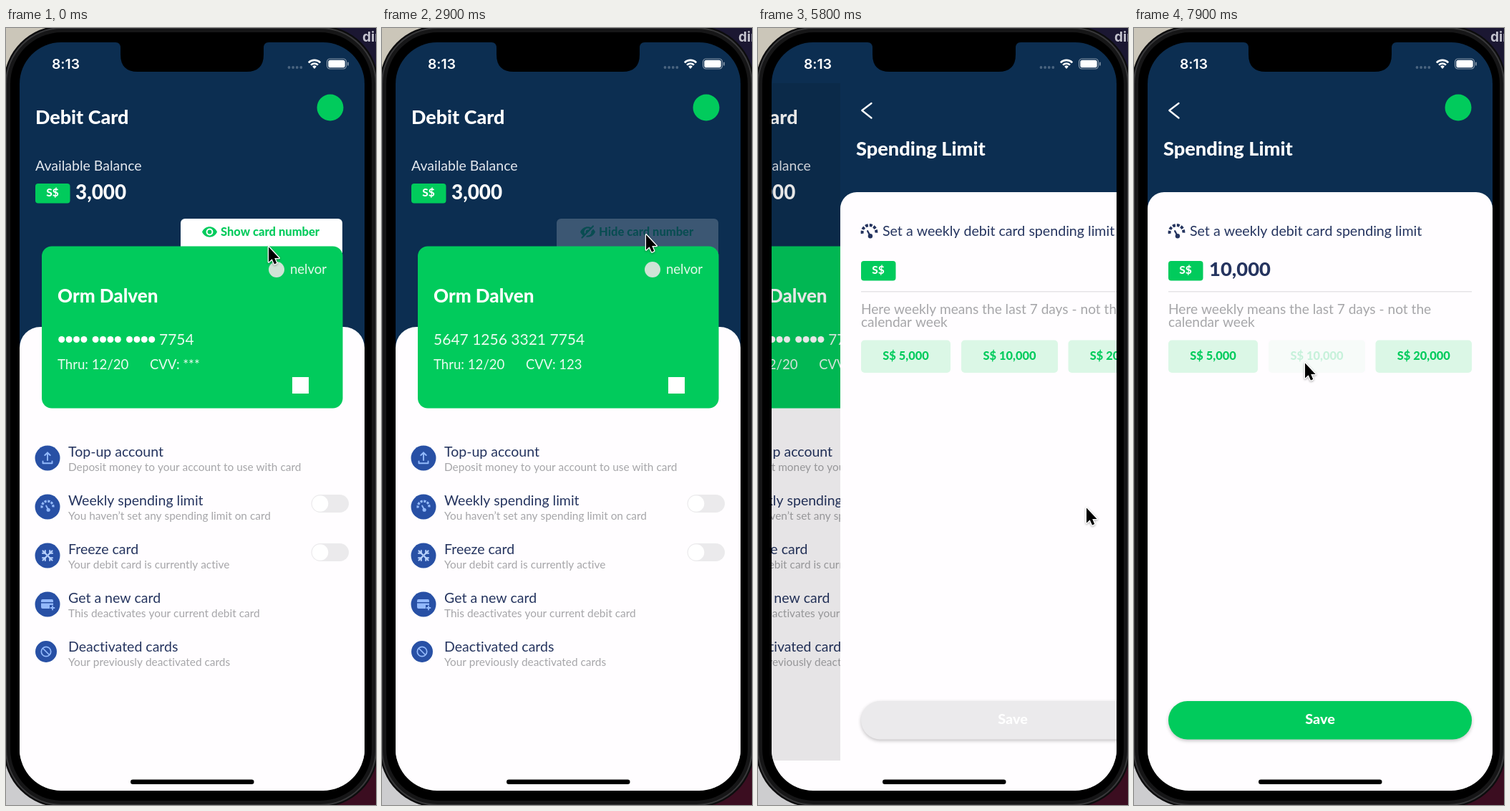
An HTML page with a canvas that plays this animation: 517 px wide and 1084 px high, repeating every 8 s.

```html
<!DOCTYPE html>
<html lang="en">
<head>
<meta charset="utf-8">
<title>Debit card app</title>
<style>
html, body { margin: 0; width: 517px; height: 1084px; overflow: hidden; background: #000; }
canvas { display: block; width: 517px; height: 1084px; }
</style>
</head>
<body>
<canvas id="stage"></canvas>
<script>
const W = 517, H = 1084, LOOP = 8000;
const NAVY = '#0c2e51', GREEN = '#01cb5c', PAPER = '#fffdff', INK = '#25345f';
const GREY = '#a6a6a9', TRACK = '#ebeaec', BLUE = '#2850a5', SKY = '#93b9fb';
const SCREEN = { x: 19, y: 20, w: 482, h: 1044 };
const SAFE_TOP = 77, SAFE_BOTTOM = 1022;

const REVEAL = { press: 650, release: 850 };
const CONCEAL = { press: 2700, release: 2980 };
const PICK = { press: 7600, release: 7870 };
const PUSH_START = 5561;
// time, x, y of the pointer tip
const POINTER = [
  [0, 366, 304], [150, 366, 304], [600, 368, 287], [3300, 368, 287],
  [4700, 456, 715], [4900, 456, 715], [5350, 458, 668], [6050, 458, 668],
  [6800, 238, 466], [8000, 238, 466]
];

const canvas = document.getElementById('stage');
const c = canvas.getContext('2d');
const dpr = window.devicePixelRatio || 1;
canvas.width = W * dpr;
canvas.height = H * dpr;

const clamp = v => Math.max(0, Math.min(1, v));
const easeInOut = p => p < .5 ? 2 * p * p : 1 - 2 * (1 - p) * (1 - p);
const mix = (a, b, p) => a + (b - a) * p;

function rect(x, y, w, h, color, radius = 0) {
  c.fillStyle = color;
  c.beginPath();
  c.roundRect(x, y, w, h, radius);
  c.fill();
}

function disc(x, y, r, color) {
  c.fillStyle = color;
  c.beginPath();
  c.arc(x, y, r, 0, 7);
  c.fill();
}

function line(points, color, width) {
  c.strokeStyle = color;
  c.lineWidth = width;
  c.lineCap = c.lineJoin = 'round';
  c.beginPath();
  points.forEach(([x, y]) => c.lineTo(x, y));
  c.stroke();
}

function text(str, x, y, size, color, weight = 400, align = 'left', family = 'Lato') {
  c.font = `${weight} ${size}px ${family}, sans-serif`;
  c.letterSpacing = '0.01px'; // any spacing turns ligatures off
  c.textAlign = align;
  c.fillStyle = color;
  c.fillText(str, x, y);
}

function layer(draw, x = 0, y = 0) {
  c.save();
  c.translate(x, y);
  draw();
  c.restore();
}

// Fades a finished area towards its background as one group.
function veil(x, y, w, h, color, opacity) {
  if (opacity === 1) return;
  layer(() => {
    c.globalAlpha = 1 - opacity;
    rect(x, y, w, h, color);
  });
}

// Fades to 0.2 while held, then back after release.
function touchAlpha(t, { press, release }) {
  const down = easeInOut(clamp((t - press) / 150));
  const up = easeInOut(clamp((t - release) / 250));
  return mix(mix(1, .2, down), 1, up);
}

function pushProgress(t) {
  const s = Math.max(0, t - PUSH_START) * .0125;
  return s > 9 ? 1 : 1 - (1 + s) * Math.exp(-s);
}

function pointerAt(t) {
  const i = POINTER.findIndex(k => k[0] > t);
  const [t0, x0, y0] = POINTER[i - 1], [t1, x1, y1] = POINTER[i];
  const p = easeInOut((t - t0) / (t1 - t0));
  return [mix(x0, x1, p), mix(y0, y1, p)];
}

function gauge(x, y, r, color) {
  layer(() => {
    c.strokeStyle = color;
    c.lineWidth = r * .34;
    c.lineCap = 'butt';
    for (let i = 0; i < 6; i++) {
      const a = Math.PI * (.94 + i * .19);
      c.beginPath();
      c.arc(0, 0, r * .84, a, a + .4);
      c.stroke();
    }
    disc(r * .12, r * .45, r * .27, color);
    line([[-r * .2, -r * .15], [r * .1, r * .4]], color, r * .2);
  }, x, y);
}

function eye(x, y, crossed) {
  layer(() => {
    c.fillStyle = GREEN;
    c.beginPath();
    c.moveTo(-10.5, 0);
    c.bezierCurveTo(-6, -9.6, 6, -9.6, 10.5, 0);
    c.bezierCurveTo(6, 9.6, -6, 9.6, -10.5, 0);
    c.fill();
    disc(0, 0, 4.9, '#fff');
    disc(0, 0, 2.9, GREEN);
    if (crossed) {
      line([[-6, 8.5], [9, -7]], '#fff', 2.4);
      line([[-8, 8], [7.5, -8]], GREEN, 2.2);
    }
  }, x, y);
}

const glyphs = {
  topUp() {
    line([[0, 3], [0, -7.5]], SKY, 1.9);
    line([[-3.7, -4], [0, -7.5], [3.7, -4]], SKY, 1.9);
    line([[-6.5, 4.5], [-6.5, 7.3], [6.5, 7.3], [6.5, 4.5]], SKY, 1.9);
  },
  limit() { gauge(0, 0, 9.5, SKY); },
  freeze() {
    for (let i = 0; i < 4; i++) {
      c.rotate(Math.PI / 2);
      line([[1, 1], [6.5, 6.5]], '#b9d2fc', 2.2);
      line([[3.2, 7], [3.2, 3.2], [7, 3.2]], '#b9d2fc', 2);
    }
  },
  newCard() {
    rect(-9, -7, 17, 4, SKY, [2, 2, 0, 0]);
    rect(-9, -1.5, 17, 7.5, SKY, [0, 0, 2, 2]);
    rect(3, 1, 8, 8, BLUE);
    line([[4.5, 5], [9.5, 5]], SKY, 1.8);
    line([[7, 2.5], [7, 7.5]], SKY, 1.8);
  },
  ban() {
    c.strokeStyle = SKY;
    c.lineWidth = 1.7;
    c.beginPath();
    c.arc(0, 0, 6.7, 0, 7);
    c.stroke();
    line([[-4.5, -4.5], [4.5, 4.5]], SKY, 1.7);
  }
};

const ROWS = [
  ['topUp', 'Top-up account', 'Deposit money to your account to use with card'],
  ['limit', 'Weekly spending limit', 'You haven’t set any spending limit on card', true],
  ['freeze', 'Freeze card', 'Your debit card is currently active', true],
  ['newCard', 'Get a new card', 'This deactivates your current debit card'],
  ['ban', 'Deactivated cards', 'Your previously deactivated cards']
];

function menuRow([icon, title, note, hasSwitch], i) {
  const y = 600 + i * 68, small = icon === 'ban';
  const ix = small ? 56 : 58, iy = small ? 870 : y;
  disc(ix, iy, small ? 15 : 17.5, BLUE);
  layer(glyphs[icon], ix, iy);
  text(title, 87, y - 2, 19.5, INK);
  text(note, 87, y + 18, 15.4, GREY);
  if (hasSwitch) {
    rect(426.5, y - 17, 52.5, 25, TRACK, 12.5);
    disc(439, y - 4.5, 11.3, '#fff');
  }
}

function badge(x, y) {
  rect(x, y, 48.5, 27.5, GREEN, 4);
  text('S$', x + 24, y + 18, 15.5, '#fff', 800, 'center');
}

function panel(top, radius) {
  rect(SCREEN.x, top, SCREEN.w, SAFE_BOTTOM - top, PAPER, [radius, radius, 0, 0]);
}

function bankCard(shown) {
  rect(50, 304.5, 420.5, 226, GREEN, 14);
  disc(378, 337, 11, '#cfe3d6');
  text('nelvor', 397, 343, 18.5, '#e4f9ec');
  text('Orm Dalven', 72, 383, 26, '#fff', 800);
  if (shown) {
    text('5647 1256 3321 7754', 72, 442, 21, '#eafbf1');
  } else {
    for (let i = 0; i < 12; i++) {
      disc(77.7 + i * 10.4 + Math.floor(i / 4) * 5.8, 434.5, 4.5, '#fff');
    }
    text('7754', 214, 442, 20.9, '#eafbf1');
  }
  text('Thru: 12/20', 72, 476, 18.6, '#eafbf1');
  text('CVV: ' + (shown ? '123' : '***'), 201, 476, 18.4, '#eafbf1');
  rect(400, 487, 23, 23, '#fff');
}

function homeScreen(t) {
  const shown = t >= REVEAL.release && t < CONCEAL.release;
  rect(SCREEN.x, SAFE_TOP, SCREEN.w, 400, NAVY);
  text('Debit Card', 41, 134, 26.9, '#fff', 800);
  disc(453, 111, 18.5, GREEN);
  text('Available Balance', 41, 199, 19.5, '#e3e8ee');
  badge(41, 217);
  text('3,000', 97, 239, 27.8, '#fff', 800);
  panel(417, 29);
  rect(244, 266, 226, 48, '#fff', [6, 6, 0, 0]);
  eye(shown ? 287.5 : 284.5, 284.5, shown);
  text(shown ? 'Hide card number' : 'Show card number', shown ? 303 : 300, 290, 16.5, GREEN, 800);
  veil(243, 265, 228, 50, NAVY, touchAlpha(t, REVEAL) * touchAlpha(t, CONCEAL));
  bankCard(shown);
  ROWS.forEach(menuRow);
}

function amountButton(x, w, amount) {
  rect(x, 435.5, w, 45.5, '#dbf7e6', 5);
  text('S$ ' + amount, x + w / 2, 463, 16.4, GREEN, 800, 'center');
}

function limitScreen(t) {
  const picked = t >= PICK.release;
  rect(SCREEN.x, SAFE_TOP, SCREEN.w, 300, NAVY);
  line([[62.5, 105], [49.3, 115], [62.5, 125.5]], '#fff', 2.3);
  disc(453, 111, 18.5, GREEN);
  text('Spending Limit', 41, 178, 27.2, '#fff', 800);
  panel(229, 23);
  gauge(59.5, 285, 11.8, INK);
  text('Set a weekly debit card spending limit', 78, 290, 19.6, INK);
  badge(48, 325);
  if (picked) text('10,000', 105, 346, 27.4, INK, 800);
  rect(48, 367, 424, 1.5, '#e5e4e7');
  text('Here weekly means the last 7 days - not the', 48, 398.5, 19.1, GREY);
  text('calendar week', 48, 417, 19.1, GREY);
  amountButton(48, 125, '5,000');
  amountButton(188, 135, '10,000');
  veil(187, 434, 137, 48, PAPER, touchAlpha(t, PICK));
  amountButton(337.5, 134.5, '20,000');
  layer(() => {
    c.shadowColor = 'rgba(0,0,0,.24)';
    c.shadowBlur = 5 * dpr;
    c.shadowOffsetY = 2 * dpr;
    rect(48, 939, 424, 53.5, picked ? GREEN : TRACK, 26.75);
  });
  text('Save', 260, 971, 19.8, '#fff', 800, 'center');
}

function clipRect(x, y, w, h, radius = 0) {
  c.beginPath();
  c.roundRect(x, y, w, h, radius);
  c.clip();
}

function app(t) {
  const p = pushProgress(t);
  clipRect(SCREEN.x, SCREEN.y, SCREEN.w, SCREEN.h, 58);
  rect(0, 0, W, 500, NAVY);
  rect(0, 500, W, H, PAPER);
  if (p < 1) {
    layer(() => homeScreen(t), -SCREEN.w * .3 * p);
    if (p > 0) rect(SCREEN.x, SAFE_TOP, SCREEN.w, SAFE_BOTTOM - SAFE_TOP, `rgba(0,0,0,${.12 * p})`);
  }
  if (p > 0) {
    layer(() => {
      clipRect(SCREEN.x, SAFE_TOP, SCREEN.w, SAFE_BOTTOM - SAFE_TOP);
      limitScreen(t);
    }, SCREEN.w * (1 - p));
  }
}

function desktop() {
  rect(0, 0, 260, 500, '#cbc6b9');
  rect(260, 0, 260, 500, '#1b1732');
  rect(0, 500, 260, 600, '#cdcdcf');
  rect(260, 500, 260, 600, '#3b0d20');
  text('dir', 498, 19, 19, '#c3c2cd', 700, 'left', 'Inter');
}

function phoneBody() {
  rect(-3, -3, W + 6, H + 6, '#0c0c0d', 80);
  rect(-1, -1, W + 2, H + 2, '#38383a', 79);
  rect(1, 1, W - 2, H - 2, '#161617', 77);
  rect(6, 6, W - 12, H - 12, '#000', 72);
}

function statusBar() {
  c.fillStyle = '#000';
  c.beginPath();
  c.moveTo(153, 18);
  c.lineTo(153, 20);
  c.quadraticCurveTo(160, 20, 160, 28);
  c.lineTo(160, 37);
  c.quadraticCurveTo(160, 61, 184, 61);
  c.lineTo(336, 61);
  c.quadraticCurveTo(360, 61, 360, 37);
  c.lineTo(360, 28);
  c.quadraticCurveTo(360, 20, 367, 20);
  c.lineTo(367, 18);
  c.fill();

  text('8:13', 64, 57, 19.3, '#fff', 600, 'left', 'Inter');
  for (let i = 0; i < 4; i++) disc(395.5 + i * 5.6, 55, 1.9, '#4b6580');

  c.strokeStyle = '#fff';
  c.lineWidth = 2.6;
  c.lineCap = 'butt';
  for (const r of [7, 11.6]) {
    c.beginPath();
    c.arc(431, 56.5, r, -Math.PI * .75, -Math.PI * .25);
    c.stroke();
  }
  c.fillStyle = '#fff';
  c.beginPath();
  c.moveTo(431, 57);
  c.arc(431, 56.5, 4, -Math.PI * .75, -Math.PI * .25);
  c.fill();

  c.strokeStyle = '#8596a8';
  c.lineWidth = 1.2;
  c.beginPath();
  c.roundRect(448.5, 43, 27, 14, 4.4);
  c.stroke();
  rect(450.3, 44.8, 23.4, 10.4, '#fff', 2.8);
  rect(477, 47.5, 1.7, 5, '#8596a8', 1);
}

function pointer(t) {
  const shape = [[1, 1.5], [1, 22.5], [5.7, 18.3], [9, 25.5], [12.2, 24.1], [9.2, 17.1], [15.6, 17]];
  layer(() => {
    c.beginPath();
    shape.forEach(([x, y]) => c.lineTo(x, y));
    c.closePath();
    c.shadowColor = 'rgba(0,0,0,.35)';
    c.shadowBlur = 3 * dpr;
    c.shadowOffsetY = dpr;
    c.lineJoin = 'round';
    c.lineWidth = 2.6;
    c.strokeStyle = '#fff';
    c.stroke();
    c.shadowColor = 'transparent';
    c.fillStyle = '#000';
    c.fill();
  }, ...pointerAt(t));
}

function frame(now) {
  const t = now % LOOP;
  c.setTransform(dpr, 0, 0, dpr, 0, 0);
  desktop();
  phoneBody();
  layer(() => app(t));
  statusBar();
  rect(174, 1048.5, 172.5, 6.5, '#000', 3.25);
  pointer(t);
}

const start = performance.now();
function tick() {
  frame(performance.now() - start);
  requestAnimationFrame(tick);
}
tick();
</script>
</body>
</html>
```
